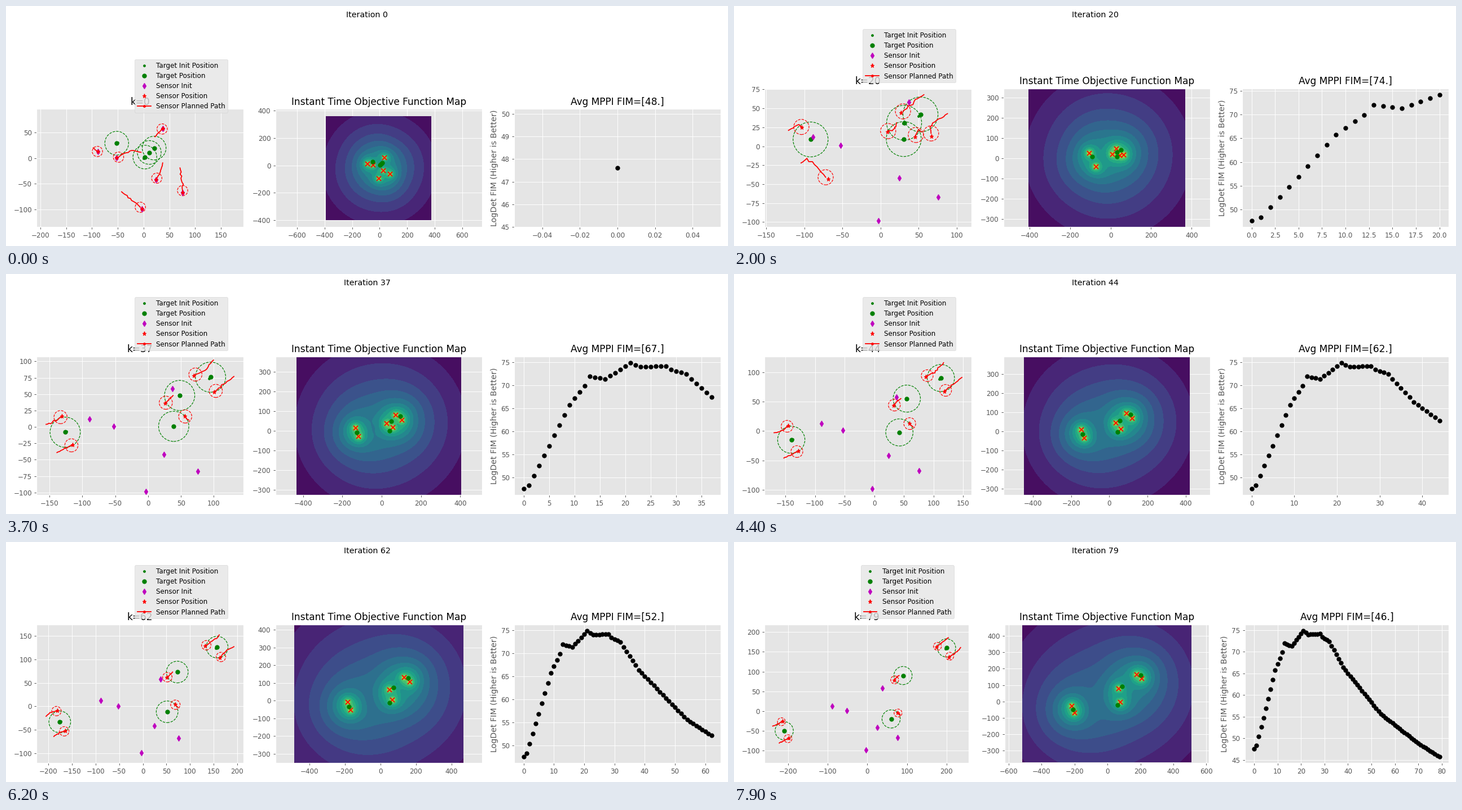
Recreate the animation shown at these times as a matplotlib script. Size 1280 px wide and 427 px high, loop 8000 ms.

```python
import numpy as np
import matplotlib.pyplot as plt
from matplotlib.animation import FuncAnimation

plt.style.use("ggplot")
W, H = 1280, 427
STEPS = 80
HORIZON = 11         # steps a sensor plans ahead
BASE = 33.6          # bottom margin of the axes, px
LEFT = 54.4
PAD = 12.8
DIGIT = 7.54         # width of a tick label digit, px

fig, axes = plt.subplots(1, 3, figsize=(15, 5.00391), dpi=85.3334)
scene, field, score = axes
heading = fig.suptitle("")

# Targets move at constant velocity
T_START = np.array([(-50, 30), (20, 20), (10, 10), (0, 0)])
T_VEL = np.array([(-2, -1), (0.5, -0.5), (1, 1), (2.5, 2)])

# Each sensor: start, followed target, final offset from it, steps to settle
SENSORS = [
    ((-88.7, 12.3), 0, (-7, 23), 25),
    ((-3, -98.3), 0, (9.5, -20), 29),
    ((24.5, -41.7), 1, (17.5, 15), 24),
    ((-52.5, 1), 2, (-21, -11), 14),
    ((37.2, 58), 3, (-23, 4), 16),
    ((76, -67.2), 3, (8, -21), 23),
]
S_START = np.array([s[0] for s in SENSORS])

# Turning points of the score curve: step, value
KEYS = np.array([(0, 47.6), (1, 48.3), (5, 56.9), (9, 65.8), (12, 69.9),
                 (13, 72), (16, 71.3), (21, 74.9), (23, 74), (28, 74.2),
                 (29, 73.45), (32, 72.4), (38, 66.4), (54, 55.6),
                 (70, 48.8), (79, 45.7)])
FIM = np.interp(np.arange(STEPS), *KEYS.T)


def target_at(n):
    return T_START + T_VEL * n


def sensor_at(sensor, n):
    """Close in on the target's side at a steady rate, then keep station."""
    start, i, offset, settle = sensor
    goal = target_at(n)[i] + offset
    gap = np.array(start) - T_START[i] - offset
    return goal + gap * max(0, 1 - n / settle)


def planned_path(sensor, n, rng):
    """Predicted motion with a slight sideways wobble."""
    pts = np.array([sensor_at(sensor, n + j) for j in range(HORIZON + 1)])
    t = np.linspace(0, 1, HORIZON + 1)
    run = pts[-1] - pts[0]
    side = np.array([-run[1], run[0]])
    bow = rng.normal(0, 0.08) + rng.normal(0, 0.03, t.size)
    return pts + np.outer(bow * np.sin(np.pi * t), side)


def objective(x, y, sensors):
    """Log determinant of the information gathered at each point."""
    a = b = c = 0
    for sx, sy in sensors:
        dx, dy = x - sx, y - sy
        r2 = dx * dx + dy * dy + 9
        a = a + dx * dx / r2 ** 3
        b = b + dx * dy / r2 ** 3
        c = c + dy * dy / r2 ** 3
    reg = 0.03 * (a + c)
    return np.log((a + reg) * (c + reg) - b * b)


def axes_height(k):
    """Height settles as the layout adapts to the tall legend."""
    settled = 246.8
    return settled + (328.8 - settled) * (-0.45) ** (k + 1)


def place(width, gap, height):
    for i, ax in enumerate(axes):
        ax.set_position([(LEFT + i * (width + gap)) / W, BASE / H,
                         width / W, height / H])
    scene.apply_aspect()
    field.apply_aspect()


def overhang(ax, width):
    """How far the last x tick label sticks out to the right."""
    lo, hi = ax.get_xlim()
    tick = max(t for t in ax.get_xticks() if t <= hi)
    half = len(f"{tick:.0f}") * DIGIT / 2
    return max(0, half - (hi - tick) / (hi - lo) * width)


def layout(k):
    """Fit once into the previous boxes, then make room for the labels."""
    width = 366.4 if k else 291.8
    place(width, 57, axes_height(k - 1))
    o1, o2, o3 = (overhang(ax, width) for ax in axes)
    lo, hi = score.get_ylim()
    ticks = [t for t in score.get_yticks() if lo <= t <= hi]
    decimals = any(abs(t - round(t)) > 1e-6 for t in ticks)
    label = 44.2 + (1.5 * DIGIT if decimals else 0)
    gap = PAD + max(o1 + 41.6, o2 + label)
    width = (W - PAD - o3 - LEFT - 2 * gap) / 3
    place(width, gap, axes_height(k))


def handle(color, marker, ls="none"):
    return plt.Line2D([], [], color=color, marker=marker, ls=ls)


LEGEND = {
    "Target Init Position": handle("g", "."),
    "Target Position": handle("g", "o"),
    "Sensor Init": handle("m", "d"),
    "Sensor Position": handle("r", "*"),
    "Sensor Planned Path": handle("r", ".", "-"),
}


def draw_scene(k, targets, sensors):
    scene.set_aspect("equal", adjustable="datalim")
    for centers, radius, color in ((targets, 23, "g"), (sensors, 10, "r")):
        for c in centers:
            scene.add_patch(plt.Circle(c, radius, fill=False, ec=color,
                                       ls="--", lw=1))
    stars = np.array([sensor_at(s, k) for s in SENSORS])
    scene.plot(*target_at(k).T, "g.")
    scene.plot(*targets.T, "go")
    scene.plot(*S_START.T, "md")
    scene.plot(*stars.T, "r*")
    rng = np.random.default_rng(k)
    for s in SENSORS:
        scene.plot(*planned_path(s, k + 1, rng).T, "r-")
    scene.set_title(f"k={k}")
    scene.legend(LEGEND.values(), LEGEND.keys(), loc="upper center",
                 bbox_to_anchor=(0.7, 1.45), labelspacing=0.43)


def draw_field(targets, sensors):
    field.set_aspect("equal", adjustable="datalim")
    both = np.vstack([targets, sensors])
    lo, hi = both.min(axis=0) - 300, both.max(axis=0) + 300
    x, y = np.meshgrid(np.linspace(lo[0], hi[0], 120),
                       np.linspace(lo[1], hi[1], 120))
    field.contourf(x, y, objective(x, y, sensors), 15, cmap="viridis")
    field.plot(*sensors.T, "rx", ms=7, mew=1.5)
    field.plot(*targets.T, "go")
    field.set_xlim(lo[0], hi[0])
    field.set_ylim(lo[1], hi[1])
    field.set_title("Instant Time Objective Function Map")


def draw_score(k):
    score.plot(range(k + 1), FIM[:k + 1], "ko")
    score.set_ylabel("LogDet FIM (Higher is Better)")
    score.set_title(f"Avg MPPI FIM=[{FIM[k]:.0f}.]")


def draw(k):
    for ax in axes:
        ax.clear()
    targets = target_at(k + 1)
    sensors = np.array([sensor_at(s, k + 1) for s in SENSORS])
    draw_scene(k, targets, sensors)
    draw_field(targets, sensors)
    draw_score(k)
    layout(k)
    heading.set_text(f"Iteration {k}")


anim = FuncAnimation(fig, draw, frames=STEPS, interval=100, repeat=True)
plt.show()
```
